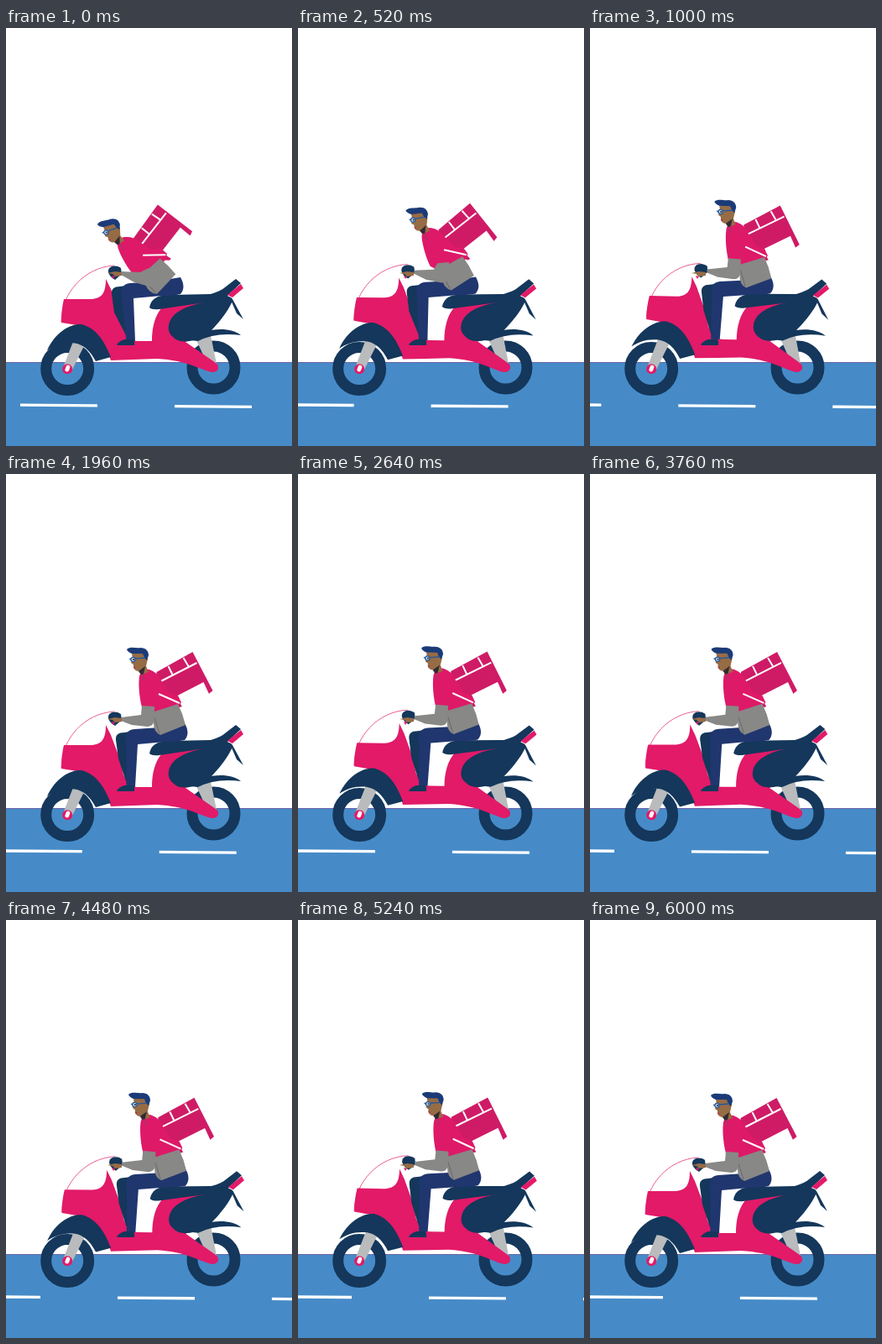
Write an HTML page that moves like this. It is 341 by 498 pixels and loops after 6040 ms.

```html
<!DOCTYPE html>
<html lang="en">
<head>
<meta charset="utf-8">
<title>Scooter delivery</title>
<style>
  html, body { margin: 0; width: 100%; height: 100%; overflow: hidden; background: #fff; }
  svg { display: block; width: 100vw; height: 100vh; }
  .navy { fill: #14375b; }
  .pink { fill: #e21a68; }
  .shirt { fill: #de1968; }
  .box { fill: #cf1b66; }
  .gray { fill: #888886; }
  .pants { fill: #20366e; }
  .skin { fill: #966c45; }
  .hair { fill: #1b3b78; }
  .road { fill: #468bc8; }
  .white { fill: #fff; }
  .line { fill: none; stroke: #fff; stroke-width: 2; }
</style>
</head>
<body>
<svg viewBox="0 0 341 498" preserveAspectRatio="none">
  <rect class="road" y="398.5" width="341" height="100"/>
  <path d="M0 398.5H341" stroke="#6b62a8"/>
  <g id="dashes" stroke="#fff" stroke-width="3.3"></g>

  <g fill="none" stroke="#14375b" stroke-width="13">
    <circle cx="73.2" cy="406" r="25.5"/>
    <circle cx="247.5" cy="404.5" r="25.5"/>
  </g>
  <path d="M69 402L81 371L95 375L79 407Z" fill="#b9bbbd"/>
  <circle class="pink" cx="73.2" cy="406.3" r="6"/>
  <rect class="white" x="70.8" y="401.5" width="4.8" height="8" rx="2.4" transform="rotate(20 73.2 406)"/>

  <g id="bike">
    <path d="M226 370L244 366L251 400L240 400Z" fill="#b9bbbd"/>
    <path class="white" d="M67 340C70 310 94 286 127 283L122 306L118 323H68Z"/>
    <path d="M66 350C66 315 94 285 129 283" fill="none" stroke="#e21a68" stroke-width=".7"/>
    <path class="pink" d="M66 351C66 340 67 331 69 323H102C115 322 119 315 119 299L125 311L136 340L140 358
      C144 367 149 373 157 373H174C174 358 177 342 187 332L242 324L258 322L250 350L214 374L250 399
      C256 403 253 411 245 410C229 406 216 396 180 394Q152 395 125 396C118 376 108 361 91 355Z"/>
    <path class="navy" d="M49 384C59 362 77 352 90 353C109 358 118 375 125 392L107 397
      C100 384 92 377 82 375.5C68 374 58 378 49 384Z"/>
    <path class="navy" d="M171 333C173 322 181 318 196 318L244 317Q257 313 261 309L274 299L280 304
      L264 319L270 323L283 347L275 340L268 324Q258 323 244 326L183 335Q174 336 171 333Z"/>
    <path class="navy" d="M194 354C197 339 214 331 240 326C263 319 270 318 270 325C265 338 250 356 240 365
      C222 375 207 376 200 369Q192 363 194 354Z"/>
    <path class="pink" d="M264 318L280 305L283 310L270 321Z"/>
    <path class="navy" d="M219 372C235 357 267 355 280 366Q250 362 229 373Z"/>

    <path id="backLeg" class="navy"/>
    <path id="frontLeg" class="pants"/>
    <path id="foot" class="navy" d="M132 377Q135 373 141 371H152Q154 374 153 378H133Z"/>
    <path class="navy" d="M122 291C121 284 130 281 137 286L138 293L130 300Q124 297 122 291Z"/>

    <g id="torso">
      <g id="box">
        <path class="box" d="M180 239L223 215L247 261L241 266L208 281L182 268Z" transform="translate(1 0)"/>
        <path class="white" d="M204 268L237 251L244 266L212 281Z"/>
        <path class="line" d="M184 251L229 228M195 232L200 242M213 222L219 232"/>
      </g>
      <path class="shirt" d="M162 232L171 233Q182 237 185 246L195 261L205 264L209 272L205 278L184 287L172 286L162 278
        C158 262 158 247 159 241Z"/>
      <path class="line" d="M182 262L207 273"/>
      <g id="hem">
        <path class="gray" d="M174 284L205 274Q211 286 214 299L184 311Q176 307 176 297Z"/>
        <path d="M175 285Q179 296 183 309" fill="none" stroke="#5d5862" stroke-width=".7"/>
      </g>
      <path d="M163 237L164 246" stroke="#5d5862" stroke-width=".7"/>
      <g id="head">
        <path class="skin" d="M150 213H165L169 220L167 229L170 236L161 239L159 235Q153 235 152 230L152 227L149 225L151 221Z"/>
        <path d="M158 235L166 229L164 238L161 239Z" fill="#342a33"/>
        <path d="M152 230L155 230L153 232Z" fill="#c4214d"/>
        <path class="hair" d="M144 209C148 205 156 208 160 207C167 207 170 211 170 216L168 222L165 219L163 214L150 214
          Q145 212 144 209Z"/>
        <circle cx="151.5" cy="221" r="2.6" fill="#cfe0e8" stroke="#24599a" stroke-width="1.3"/>
        <path d="M154 220L166 219M147 220L149 221" stroke="#24599a" stroke-width="1.3"/>
        <circle cx="152" cy="221" r="1" fill="#241d2a"/>
      </g>
    </g>
    <path id="arm" class="gray"/>
    <g id="hand">
      <path class="skin" d="M121 292L130 290L138 291V295L130 296L127 293Z"/>
      <path class="pink" d="M126 295L130 296L128 299Z"/>
    </g>
  </g>
</svg>
<script>
  const LOOP = 6040, STEP = 40, BOB = 2000, RISE = 1000;
  const PERIOD = 184, DASH = 92, SPEED = 10.893 / STEP;
  const $ = id => document.getElementById(id);
  const set = (id, name, value) => $(id).setAttribute(name, value);

  const dashes = Array.from({ length: 4 }, () => {
    const path = document.createElementNS("http://www.w3.org/2000/svg", "path");
    return $("dashes").appendChild(path);
  });
  const roadY = x => 449 + x * 0.0078;

  function drawDashes(time) {
    const first = (17 + time * SPEED) % PERIOD - PERIOD;
    dashes.forEach((dash, i) => {
      const x = first + i * PERIOD;
      dash.setAttribute("d", `M${x} ${roadY(x)}L${x + DASH} ${roadY(x + DASH)}`);
    });
  }

  function drawRider(lean) {
    const mix = (a, b) => a + (b - a) * lean;
    const point = (x, y, leanX, leanY) => `${mix(x, leanX)} ${mix(y, leanY)}`;

    set("torso", "transform", `translate(${-2 * lean} ${-3 * lean}) rotate(${-25 * lean} 200 306)`);
    set("head", "transform", `rotate(${10 * lean} 165 233)`);
    set("box", "transform", `translate(${lean - 1.5} ${3 * lean - 3})`);
    set("hem", "transform", `translate(${-6 * lean} 0)`);
    set("arm", "d", `M137 290L${point(161, 287, 160, 291)}L${point(162, 276, 168, 287)}
      L${point(177, 277, 180, 283)}L${point(177, 290, 182, 297)}
      Q${point(177, 301, 179, 309)} ${point(169, 301, 171, 308)}
      L${point(150, 299, 153, 303)}L137 294Z`);

    const s = -5 * lean;
    set("backLeg", "d", `M${131 + s} 317Q${130 + s} 308 ${141 + s} 308L${160 + s} 305L${154 + s} 330L150 366H143L${134 + s} 339Z`);
    set("frontLeg", "d", `M143.5 373L${143 + s} 322Q${140 + s} 305 ${153 + s} 304L${183 + s} 302L${213 + s} 297
      Q${220 + s} 309 ${213 + s} 317Q${204 + s} 319 ${190 + s} 319L${157 + s} 322L154 373Z`);
  }

  function drawBike(bob) {
    const turn = angle => `rotate(${angle} 248 405)`;
    const tilt = 1.27 * bob;
    set("bike", "transform", turn(tilt));
    // Hand and foot hold still while the bike rocks.
    set("hand", "transform", turn(-tilt));
    set("foot", "transform", turn(-tilt));
  }

  function draw(time) {
    const rise = Math.min(time / RISE, 1);
    drawDashes(time);
    drawRider(1 - rise * rise * (3 - 2 * rise));
    drawBike((1 - Math.cos(2 * Math.PI * time / BOB)) / 2);
  }

  const start = performance.now();
  function tick() {
    const time = (performance.now() - start) % LOOP;
    draw(Math.floor(time / STEP) * STEP);
    requestAnimationFrame(tick);
  }
  tick();
</script>
</body>
</html>
```
